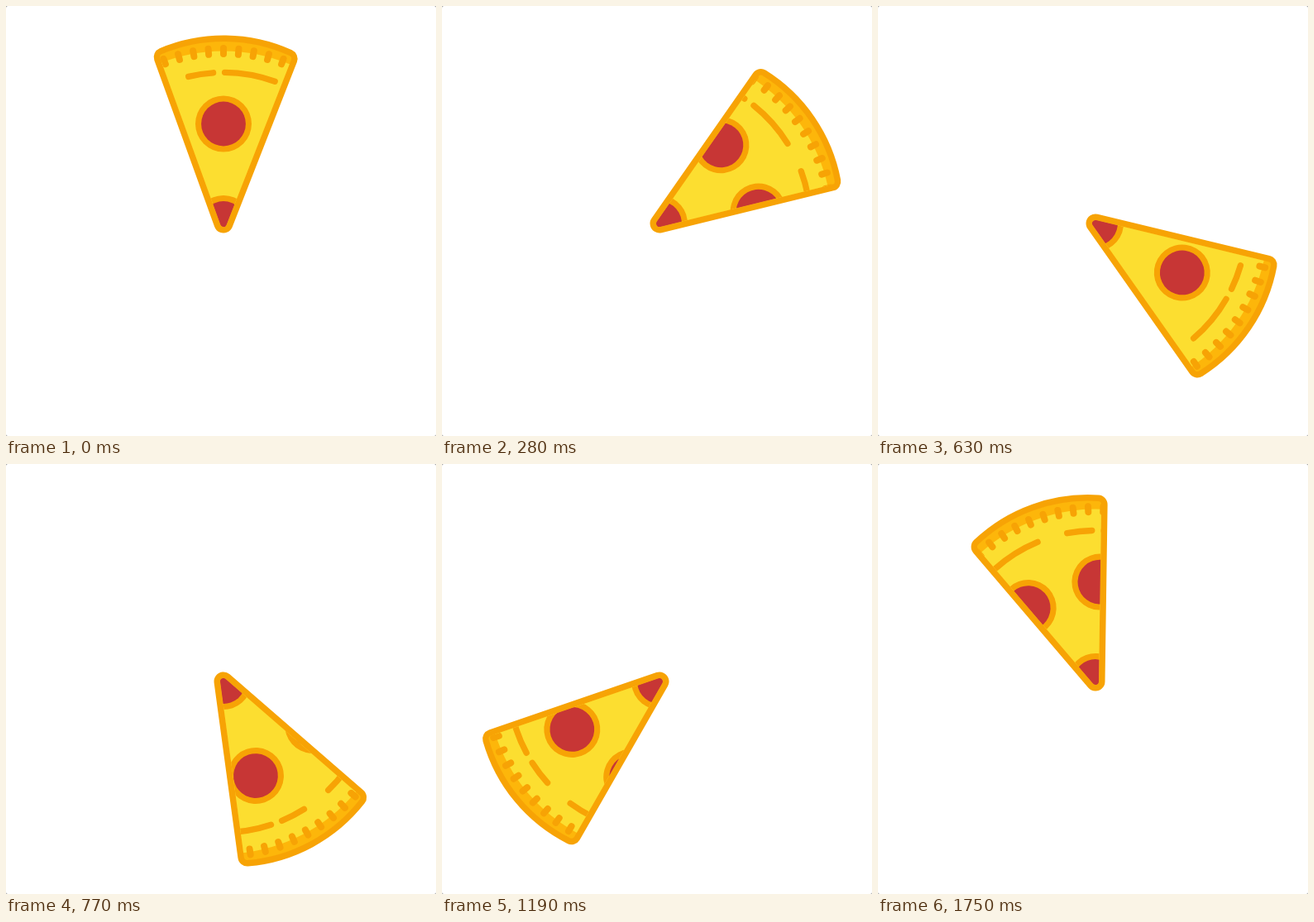
An HTML page with a canvas that plays this animation: 520 px wide and 520 px high, repeating every 1.82 s.

```html
<!DOCTYPE html>
<html lang="en">
<head>
<meta charset="utf-8">
<title>Pizza slice</title>
<style>
  html, body { margin: 0; width: 100%; height: 100%; overflow: hidden; background: #999; }
  canvas { display: block; width: 520px; height: 520px; }
</style>
</head>
<body>
<canvas id="stage"></canvas>
<script>
const SIZE = 520, CENTER = 263;
const STEP_MS = 70, STEPS = 26, TICKS = 105;
const ORANGE = '#f7a305', YELLOW = '#fcde30', AMBER = '#fdb60a', RED = '#c73635';
const RADIUS = 214, BULGE = 2, HALF = rad(20.65), START = rad(0.75);

// The crust arc joins both corners but bulges past RADIUS in the middle.
const cornerX = RADIUS * Math.cos(HALF), cornerY = RADIUS * Math.sin(HALF);
const rise = RADIUS + BULGE - cornerX;
const crustRadius = (cornerY ** 2 + rise ** 2) / (2 * rise);
const crustX = RADIUS + BULGE - crustRadius;
const crustHalf = Math.asin(cornerY / crustRadius);

const canvas = document.getElementById('stage');
const ctx = canvas.getContext('2d');
const ratio = window.devicePixelRatio || 1;
canvas.width = canvas.height = SIZE * ratio;

function rad(deg) { return deg * Math.PI / 180; }

// Four ticks per step, with a few uneven steps near the end.
function tickAt(step) {
  return 4 * step - (step >= 17) + (step >= 24) - (step >= 25);
}

function disc(x, y, r, color) {
  ctx.fillStyle = color;
  ctx.beginPath();
  ctx.arc(x, y, r, 0, 2 * Math.PI);
  ctx.fill();
}

// Slice along the x axis with its apex at the origin, grown outward by r.
function wedge(r) {
  const q = Math.PI / 2;
  const path = new Path2D();
  path.arc(crustX, 0, crustRadius + r, -crustHalf, crustHalf);
  path.arc(cornerX, cornerY, r, crustHalf, HALF + q);
  path.arc(0, 0, r, HALF + q, 3 * q - HALF);
  path.arc(cornerX, -cornerY, r, -HALF - q, -crustHalf);
  path.closePath();
  return path;
}

const outline = wedge(11.5), inside = wedge(4);

function pepperoni(x, y) {
  disc(x, y, 34, ORANGE);
  disc(x, y, 26.9, RED);
}

function dash(from, to) {
  ctx.beginPath();
  ctx.arc(0, 0, 182.6, rad(from - 90), rad(to - 90));
  ctx.stroke();
}

function pizza() {
  disc(0, 0, 230, AMBER);
  disc(0, 0, 208.5, YELLOW);
  ctx.strokeStyle = ORANGE;
  ctx.lineCap = 'round';
  pepperoni(0, 0);
  for (let i = 0; i < 8; i++) {
    ctx.save();
    ctx.rotate(rad(45 * i));
    pepperoni(0, -120.5);
    ctx.lineWidth = 7.4;
    dash(-13.4, -3.9);
    dash(0.5, 19.9);
    ctx.lineWidth = 8;
    for (let j = 0; j < 9; j++) {
      ctx.beginPath();
      ctx.moveTo(0, -205);
      ctx.lineTo(0, -212);
      ctx.stroke();
      ctx.rotate(rad(5));
    }
    ctx.restore();
  }
}

function draw(ms) {
  const turn = tickAt(Math.floor(ms / STEP_MS) % STEPS) / TICKS;
  const mid = START + turn * 2 * Math.PI - Math.PI / 2;

  ctx.setTransform(ratio, 0, 0, ratio, 0, 0);
  ctx.clearRect(0, 0, SIZE, SIZE);
  ctx.fillStyle = '#fff';
  ctx.beginPath();
  ctx.roundRect(0, 0, SIZE, SIZE, 2.5);
  ctx.fill();

  ctx.save();
  ctx.translate(CENTER, CENTER);
  ctx.rotate(mid);
  ctx.fillStyle = ORANGE;
  ctx.fill(outline);
  ctx.clip(inside);
  ctx.rotate(-mid - turn * Math.PI / 4);
  pizza();
  ctx.restore();
}

const begin = performance.now();
function loop() {
  draw(performance.now() - begin);
  requestAnimationFrame(loop);
}
loop();
</script>
</body>
</html>
```
